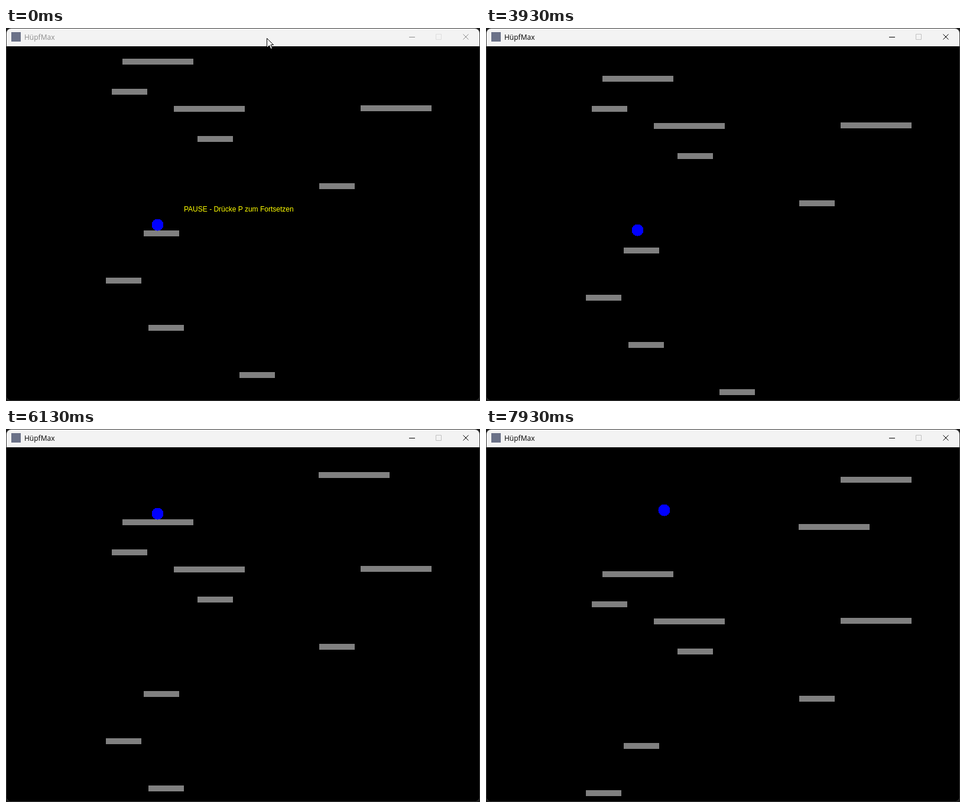
Recreate the animation shown at these times as an HTML page. Size 802x632 px, loop 8 s.

```html
<!DOCTYPE html>
<html lang="de">
<head>
<meta charset="utf-8">
<title>Plattformspiel</title>
<style>
  html, body { margin: 0; width: 100%; height: 100%; overflow: hidden; background: #1c1c1c; }
  svg { display: block; width: 802px; height: 632px; }
  .crisp { shape-rendering: crispEdges; }
  #title { font: 12px "Open Sans", "Noto Sans", sans-serif; }
  #pause { font: 12px "Liberation Sans", Arial, sans-serif; fill: #ff0; }
</style>
</head>
<body>
<svg viewBox="0 0 802 632">
  <defs>
    <clipPath id="window"><rect x="1" y="1" width="800" height="630" rx="7.5"/></clipPath>
    <clipPath id="field"><rect x="1" y="31" width="800" height="600"/></clipPath>
  </defs>
  <rect x=".5" y=".5" width="801" height="631" rx="8" fill="#000" stroke="#3a3a3a"/>
  <g clip-path="url(#window)">
    <rect class="crisp" x="1" y="1" width="800" height="30" fill="#f3f3f3"/>
    <rect class="crisp" x="9" y="7" width="16" height="16" fill="#6b7288"/>
    <g id="caption" fill="none" stroke="currentColor">
      <text id="title" x="31" y="20" fill="currentColor" stroke="none">HüpfMax</text>
      <path class="crisp" d="M682 15.5h10"/>
      <rect x="727.5" y="10.5" width="9" height="9" rx=".5" opacity=".2"/>
      <path d="M773.5 10.5l9 9m0-9l-9 9"/>
    </g>
    <g clip-path="url(#field)" class="crisp">
      <g id="platforms" fill="#808080"></g>
      <circle id="ball" r="10" fill="#00f"/>
    </g>
    <text id="pause" x="301" y="311">PAUSE - Drücke P zum Fortsetzen</text>
    <path id="cursor" d="M.5 .5V16.5L4.5 12.5L7 18.5L9.5 17.5L7 11.5H11.5Z" fill="#fff" stroke="#000"/>
  </g>
</svg>
<script>
const LOOP = 8000, FRAME = 1000 / 15, RESUME = 3130;
const GAME_START = 3045, TICK = 30.3;
const PLATFORM_GAP = 80, JUMP_SPEED = 20, RADIUS = 10;
const $ = id => document.getElementById(id);

// Platforms stacked upwards at a constant distance
const stack = (bottom, width, ...xs) =>
  xs.map((x, i) => ({ x, y: bottom - i * PLATFORM_GAP, width }));

const platforms = [
  ...stack(583, 60, 395, 241, 169, 233, 530, 324, 179),
  ...stack(132, 120, 284, 197, 529, 600),
  ...stack(131, 120, 600)
];

for (const { x, y, width } of platforms) {
  const rect = document.createElementNS("http://www.w3.org/2000/svg", "rect");
  for (const [name, value] of Object.entries({ x, y, width, height: 10 }))
    rect.setAttribute(name, value);
  $("platforms").append(rect);
}

// Player input, in game ticks
const jumps = [29, 45, 178];
const walks = [
  { from: 103, ticks: 34, distance: 110 },
  { from: 143, ticks: 22, distance: -65 }
];

// Each tick sinks the platforms by one pixel; ticks come twice as fast while walking.
function simulate() {
  let x = 256.5, y = 333, speed = 0, time = GAME_START;
  const states = [{ time, x, y }];
  for (let tick = 1; time < LOOP; tick++) {
    const walk = walks.find(w => tick > w.from && tick <= w.from + w.ticks);
    time += walk ? TICK / 2 : TICK;
    if (walk) x += walk.distance / walk.ticks;
    if (jumps.includes(tick)) speed = -JUMP_SPEED;
    const oldFeet = y + RADIUS;
    y += ++speed;
    const floor = speed > 0 && platforms.find(p =>
      x + RADIUS > p.x && x - RADIUS < p.x + p.width &&
      oldFeet < p.y + tick && y + RADIUS >= p.y + tick);
    if (floor) {
      y = floor.y + tick - RADIUS;
      speed = 0;
    }
    states.push({ time, x, y });
  }
  return states;
}
const states = simulate();

// Eased progress from 0 to 1 between two times
function progress(time, from, to) {
  const k = Math.min(1, Math.max(0, (time - from) / (to - from)));
  return k * k * (3 - 2 * k);
}
const curve = (a, b, c, k) => (1 - k) ** 2 * a + 2 * k * (1 - k) * b + k * k * c;

// The pointer swings down to the left, rests, then slides down to the right.
function cursorAt(time) {
  const swing = progress(time, 133, 1067), slide = progress(time, 1467, 1933);
  return [
    curve(441, 145, 265, swing) + 247 * slide,
    curve(17, 555, 329, swing) + 209 * slide
  ].map(Math.round);
}

const show = (element, visible) =>
  element.setAttribute("visibility", visible ? "visible" : "hidden");

function draw(now) {
  const time = Math.floor((now % LOOP + 4) / FRAME) * FRAME;
  const playing = time >= RESUME;
  const tick = playing ? states.findLastIndex(s => s.time <= time) : 0;

  $("platforms").setAttribute("transform", `translate(0 ${tick})`);
  $("ball").setAttribute("cx", states[tick].x);
  $("ball").setAttribute("cy", states[tick].y + .5);

  $("cursor").setAttribute("transform", `translate(${cursorAt(time)})`);
  show($("cursor"), !playing);
  show($("pause"), !playing);

  const gray = Math.round(140 * (1 - progress(time, 1000, 1200)));
  $("caption").style.color = `rgb(${gray},${gray},${gray})`;
}

let start;
function loop(now) {
  start ??= now;
  draw(now - start);
  requestAnimationFrame(loop);
}
draw(0);
requestAnimationFrame(loop);
</script>
</body>
</html>
```
